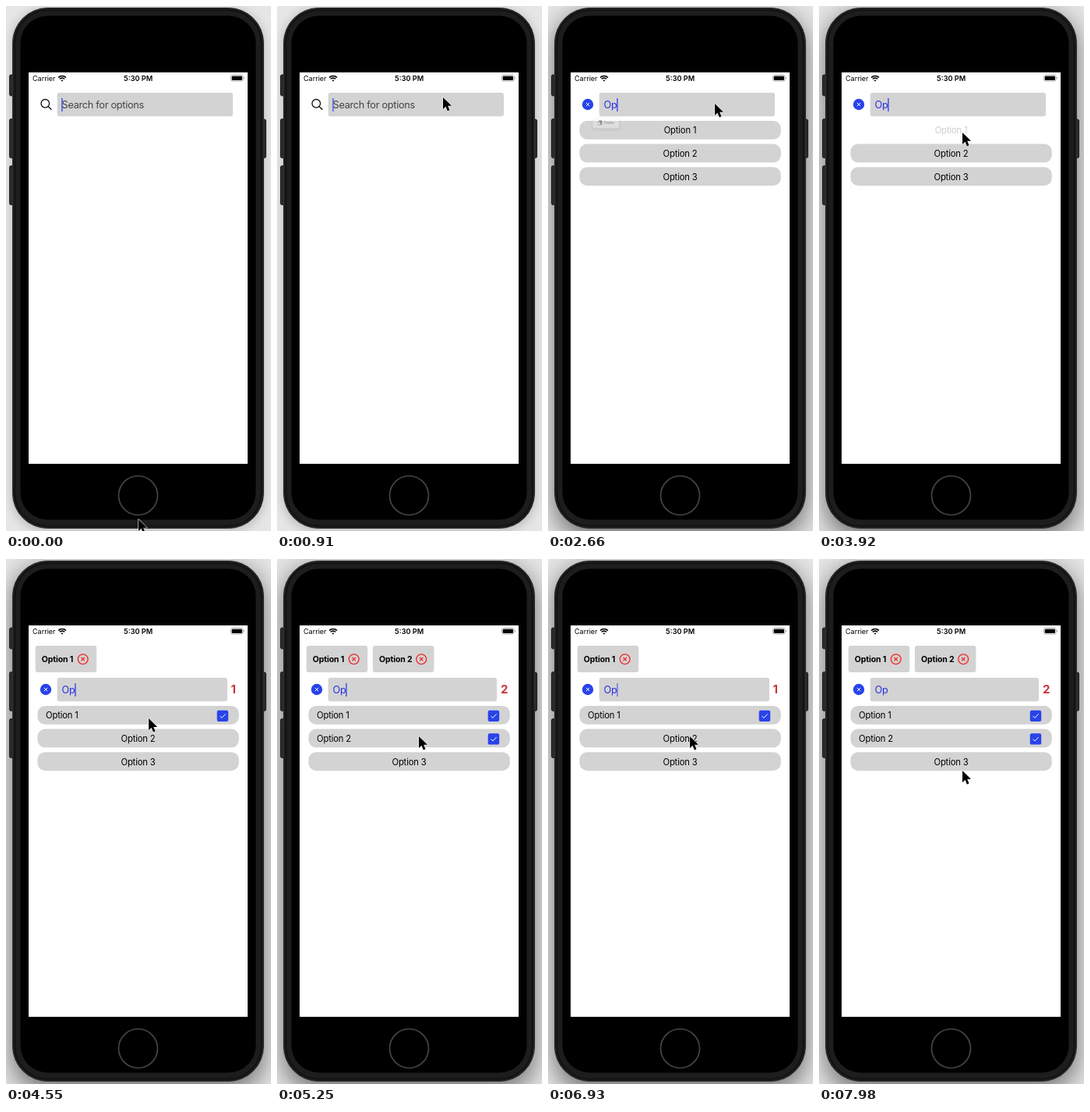
Recreate the animation shown at these times as an HTML page. Size 340 by 672 pixels, loop 8000 ms.

```html
<!DOCTYPE html>
<html lang="en">
<head>
<meta charset="utf-8">
<title>Multi-select search</title>
<style>
html, body { margin: 0; width: 100%; height: 100%; overflow: hidden; background: #dedede; }
svg { display: block; width: 340px; height: 672px; }
text { font-family: Inter, "Liberation Sans", sans-serif; white-space: pre; }
.row { font-size: 11.25px; letter-spacing: -.17px; }
.tag { font-size: 10.5px; font-weight: 700; letter-spacing: -.1px; }
.field { font-size: 12.75px; letter-spacing: -.3px; }
</style>
</head>
<body>
<svg viewBox="0 0 340 672">
  <defs>
    <filter id="soft" x="-20%" y="-20%" width="140%" height="140%"><feGaussianBlur stdDeviation="7"/></filter>
    <filter id="wide" x="-20%" y="-20%" width="140%" height="140%"><feGaussianBlur stdDeviation="16"/></filter>
    <filter id="glow" x="-30%" y="-40%" width="160%" height="200%"><feGaussianBlur stdDeviation="3"/></filter>
    <clipPath id="wifiClip"><path d="M72 96.6L64 88.6V84H80V88.6Z"/></clipPath>
  </defs>

  <rect width="340" height="672" fill="#e6e6e6"/>
  <rect id="idleShade" x="8" y="4" width="323" height="668" rx="44" opacity=".2" filter="url(#soft)"/>
  <rect id="focusShade" x="8" y="10" width="323" height="672" rx="44" opacity=".5" filter="url(#wide)"/>

  <g fill="#2a2a2a" stroke="#111" stroke-width=".8">
    <rect x="4.5" y="88" width="8" height="27" rx="2"/>
    <rect x="4.5" y="144.500" width="8" height="50" rx="2"/>
    <rect x="4.5" y="204.500" width="8" height="50" rx="2"/>
    <rect x="326" y="145" width="7.500" height="49.500" rx="2"/>
  </g>
  <rect x="8.500" y="2.500" width="322" height="666" rx="45" fill="#1d1d1d" stroke="#303030"/>
  <rect x="11.500" y="5.500" width="316" height="660" rx="42" fill="none" stroke="#101010" stroke-width="1.500"/>
  <rect x="18.500" y="12.500" width="302" height="645" rx="35"/>
  <circle cx="169.500" cy="626.500" r="25" fill="none" stroke="#454545" stroke-width="1.700"/>
  <rect x="29" y="85" width="281" height="501" fill="#fff"/>

  <text x="34" y="96" font-size="9">Carrier</text>
  <text x="169.700" y="96" font-size="9.200" font-weight="600" text-anchor="middle">5:30 PM</text>
  <g clip-path="url(#wifiClip)" fill="none" stroke="#000" stroke-width="1.700">
    <circle cx="72" cy="96.500" r="7"/>
    <circle cx="72" cy="96.500" r="4.400"/>
    <circle cx="72" cy="96.500" r="1.200" fill="#000"/>
  </g>
  <rect x="288.500" y="88.500" width="15.700" height="7.600" rx="2.200" fill="none" stroke="#999" stroke-width=".8"/>
  <rect x="289.700" y="89.700" width="13.300" height="5.200" rx="1.200"/>
  <path d="M305.200 91v2.600q1-.4 1-1.300t-1-1.300" fill="#999"/>

  <g id="tags"></g>
  <text id="count" x="291.700" y="171.500" font-size="15" font-weight="700" fill="#c9353a" text-anchor="middle"></text>
  <g id="form">
    <rect id="box" x="65.700" y="111" width="225.300" height="30.300" rx="3" fill="#d3d3d3"/>
    <g id="lens" fill="none" stroke="#111" stroke-width="1.300" stroke-linecap="round">
      <circle cx="50.300" cy="124.800" r="5.300"/><path d="M54.200 128.700L58 132.300"/>
    </g>
    <g id="clear">
      <circle cx="51" cy="126" r="7.200" fill="#2843ea"/>
      <path d="M48.900 123.900l4.200 4.200m0-4.200l-4.200 4.200" stroke="#fff" stroke-width="1"/>
    </g>
    <text id="value" class="field" x="71.500" y="131"></text>
    <rect id="caret" y="118" width="1.500" height="17" fill="#4350e6"/>
    <g id="rows"></g>
  </g>

  <g id="paste">
    <rect x="39" y="147" width="78" height="34" rx="9" opacity=".16" filter="url(#glow)"/>
    <path d="M48 145.500H67L72 141l5 4.500h29q7 0 7 7v15.500q0 7-7 7H48q-7 0-7-7v-15.500q0-7 7-7Z" fill="#f6f6f6"/>
    <rect x="57.500" y="153.300" width="8.800" height="12" rx="1.500"/>
    <path d="M55.300 156.500h3.700l3 3v7h-6.700Z" fill="#f6f6f6" stroke="#000" stroke-linejoin="round"/>
    <path d="M58.800 156.300v3.400h3.400Z"/>
    <text x="71.500" y="163.600" font-size="10.500">Paste</text>
  </g>

  <path id="pointer" d="M0 0V15L3.500 11.800 5.900 17.400 8.500 16.300 6.200 10.800H11Z" stroke="#fff" stroke-width="1.100" paint-order="stroke" stroke-linejoin="round"/>
</svg>
<script>
const LOOP = 8000, STEP = 70, SHIFT = 41;
const $ = id => document.getElementById(id);
const set = (id, attrs) => { for (const k in attrs) $(id).setAttribute(k, attrs[k]); };
const show = (id, on) => set(id, { display: on ? "inline" : "none" });
const clamp = x => Math.max(0, Math.min(1, x));
const ease = x => x * x * (3 - 2 * x);

// [time, x, y] of the pointer tip
const path = [
  [0, 170, 657], [840, 211, 120], [910, 213, 117], [980, 214, 125],
  [3220, 214, 125], [3570, 184, 162], [4270, 184, 162], [4620, 183, 209],
  [4690, 183, 209], [5040, 182, 227], [7070, 182, 227], [7630, 184, 271]
];
// the caret fades out and in alternately, starting at these times
const blinks = [250, 610, 900, 1230, 1940, 2240, 2730, 3270, 3930, 4290, 4940, 5130,
  5845, 6230, 6900, 7260, 7745];
// [press, result, row, selected rows after it]
const taps = [
  [3640, 3990, 0, 1], [5110, 5250, 1, 2], [6160, 6370, 1, 1], [6940, 7070, 1, 2]
];

function pointerAt(t) {
  let i = 1;
  while (i < path.length && path[i][0] < t) i++;
  if (i === path.length) return path[i - 1];
  const a = path[i - 1], b = path[i], k = ease(clamp((t - a[0]) / (b[0] - a[0])));
  return a.map((v, j) => v + (b[j] - v) * k);
}

function caretAt(t) {
  let n = 0;
  while (n < blinks.length && blinks[n] <= t) n++;
  if (!n) return 1;
  const k = clamp((t - blinks[n - 1]) / 100);
  return n % 2 ? 1 - k : k;
}

function buildRows() {
  let rows = "", tags = "";
  for (let i = 0; i < 3; i++) {
    const y = 147 + i * 29.6;
    rows += `<g id="row${i}">
      <rect id="pill${i}" x="40.500" y="${y}" width="258.300" height="23.700" rx="9.500" fill="#d3d3d3"/>
      <text id="label${i}" class="row" y="${y + 16.300}">Option ${i + 1}</text>
      <g id="check${i}" transform="translate(270.700 ${y + 5.700})">
        <rect width="14.500" height="14.300" rx="2.200" fill="#2843ea"/>
        <path d="M3.800 7.300l2.400 2.400 4.700-5" fill="none" stroke="#fff"/>
      </g></g>`;
  }
  for (let i = 0; i < 2; i++) {
    const x = 37.700 + i * 85.200;
    tags += `<g id="tag${i}" transform="translate(${x} 111)">
      <rect width="78.500" height="34" rx="3" fill="#d3d3d3"/>
      <text class="tag" x="8" y="20.800">Option ${i + 1}</text>
      <g fill="none" stroke="#ee2b2b" stroke-width="1.300">
        <circle cx="${61 + i * 1.300}" cy="17.200" r="6.400"/>
        <path d="M${58.800 + i * 1.300} 15l4.400 4.400m0-4.400l-4.400 4.400"/>
      </g></g>`;
  }
  $("rows").innerHTML = rows;
  $("tags").innerHTML = tags;
}

function render(time) {
  const t = Math.floor(time / STEP) * STEP;
  const [, x, y] = pointerAt(t);
  set("pointer", { transform: `translate(${x} ${y})` });

  const focused = t >= 1260;
  show("idleShade", !focused);
  show("focusShade", focused);

  let picked = 0, pressed = -1, dim = 1;
  for (const [down, up, row, after] of taps) {
    if (t >= up) picked = after;
    else if (t > down) {
      pressed = row;
      dim = 1 - .8 * ease(clamp((t - down) / 260));
    }
  }

  const typed = t >= 2590;
  set("form", { transform: `translate(0 ${picked ? SHIFT : 0})` });
  set("box", { width: [225.300, 218.300, 216.300][picked] });
  $("count").textContent = picked || "";
  show("lens", !typed);
  show("clear", typed);
  $("value").textContent = typed ? "Op" : "Search for options";
  set("value", { fill: typed ? "#2b31e0" : "#444" });
  set("caret", { x: typed ? 88.200 : 71.200, opacity: caretAt(t) });

  show("rows", typed);
  for (let i = 0; i < 3; i++) {
    const on = i < picked, o = i === pressed ? dim : 1;
    set("pill" + i, { opacity: (o - .2) / .8 });
    set("label" + i, { x: on ? 51 : 169.500, "text-anchor": on ? "start" : "middle", opacity: o });
    set("check" + i, { opacity: o });
    show("check" + i, on);
    if (i < 2) show("tag" + i, on);
  }

  const out = clamp((t - 2520) / 270), s = 1 - .53 * clamp(out * 2);
  show("paste", t >= 1540 && out < 1);
  set("paste", {
    opacity: out ? Math.pow(1 - out, 1.500) : clamp((t - 1470) / 210),
    transform: `translate(72 140) scale(${s}) translate(-72 -140)`
  });
}

buildRows();
const start = performance.now();
function tick() {
  render((performance.now() - start) % LOOP);
  requestAnimationFrame(tick);
}
render(0);
requestAnimationFrame(tick);
</script>
</body>
</html>
```
